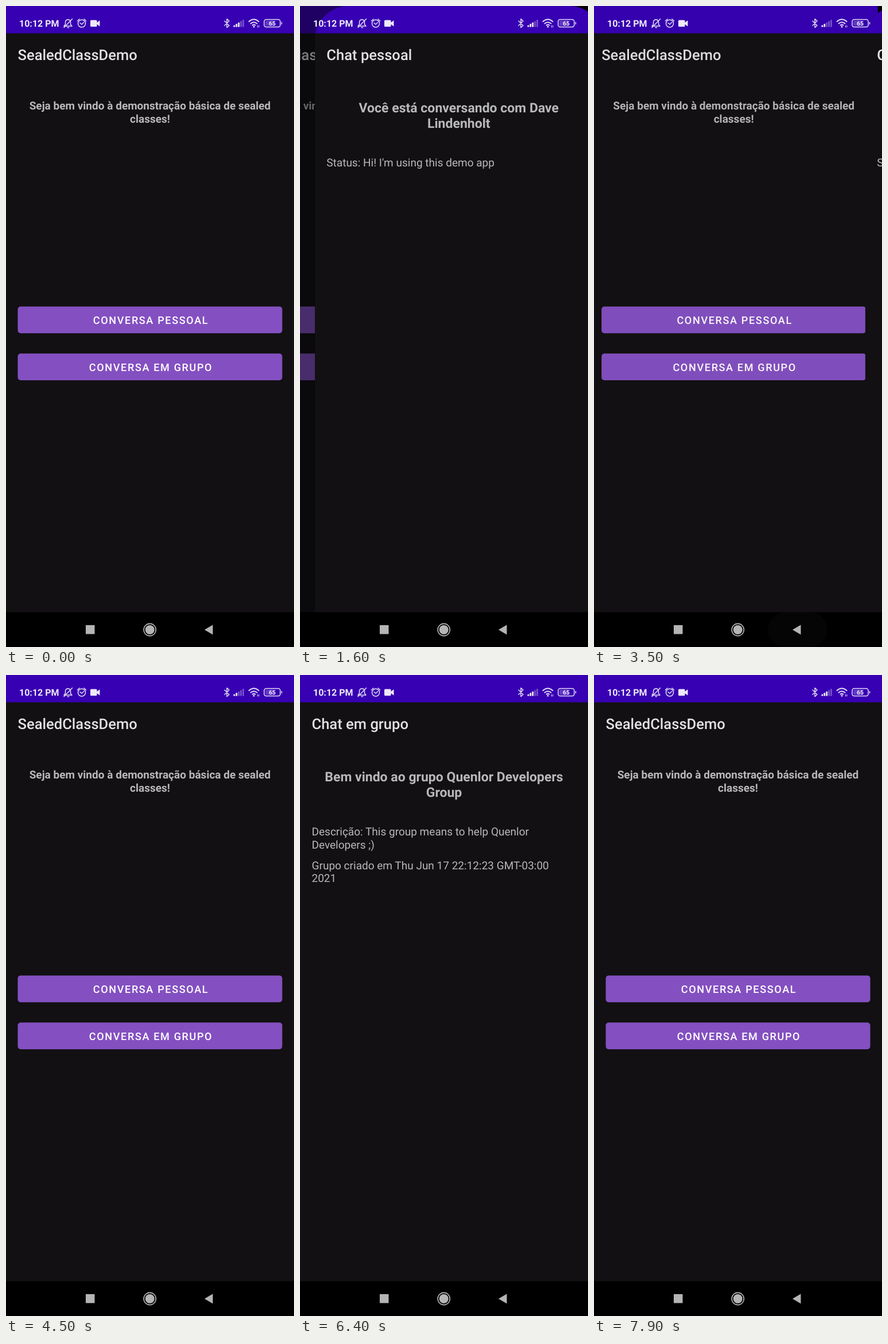
Write an HTML page that moves like this. It is 502 px wide and 1115 px high and loops after 8000 ms.

```html
<!DOCTYPE html>
<html lang="pt">
<head>
<meta charset="utf-8">
<title>Chat demo</title>
<style>
html, body { margin: 0; width: 100%; height: 100%; overflow: hidden; background: #000; }
svg { display: block; width: 100%; height: 100%; }
text { font-family: Roboto, sans-serif; font-size: 19.03px; fill: #b9b8b9; text-rendering: geometricPrecision; }
.title { font-size: 25.56px; font-weight: 500; fill: #e3e2e3; }
.bold { font-weight: 700; text-anchor: middle; }
.big { font-size: 23px; }
.label { font-size: 18.1px; font-weight: 500; letter-spacing: .0893em; text-anchor: middle; fill: #fff; }
.clock { font-size: 16px; font-weight: 700; fill: #efeaf9; }
.charge { font-size: 10.5px; font-weight: 700; text-anchor: middle; fill: #efeaf9; }
.line { fill: none; stroke: #e4dcf4; stroke-width: 1.5; stroke-linecap: round; stroke-linejoin: round; }
.solid { fill: #efeaf9; }
</style>
</head>
<body>
<svg viewBox="0 0 502 1115">
  <defs>
    <clipPath id="window"><rect id="corner" width="502" height="1200"/></clipPath>
    <clipPath id="button0"><rect x="20.5" y="522.8" width="461" height="46.4" rx="5"/></clipPath>
    <clipPath id="button1"><rect x="20.5" y="604.5" width="461" height="46.4" rx="5"/></clipPath>
    <g id="page">
      <rect width="502" height="1115" fill="#121013"/>
      <rect width="502" height="47.5" fill="#3700b3"/>
    </g>
  </defs>

  <g id="home">
    <use href="#page"/>
    <text class="title" x="20.5" y="93.5">SealedClassDemo</text>
    <text class="bold" x="251" y="180.3">Seja bem vindo à demonstração básica de sealed</text>
    <text class="bold" x="251" y="202.8">classes!</text>
    <g clip-path="url(#button0)">
      <rect y="520" width="502" height="52" fill="#8450c1"/>
      <circle class="ripple" cx="422" cy="544"/>
    </g>
    <g clip-path="url(#button1)">
      <rect y="602" width="502" height="52" fill="#8450c1"/>
      <circle class="ripple" cx="410" cy="628"/>
    </g>
    <text class="label" x="252.5" y="553">CONVERSA PESSOAL</text>
    <text class="label" x="252.5" y="634.7">CONVERSA EM GRUPO</text>
  </g>
  <rect id="dim" width="502" height="1115"/>

  <g id="chat"><g clip-path="url(#window)">
    <use href="#page"/>
    <g class="body">
      <text class="title" x="20.5" y="93.5">Chat pessoal</text>
      <text class="bold big" x="251" y="184.5">Você está conversando com Dave</text>
      <text class="bold big" x="251" y="211.5">Lindenholt</text>
      <text x="20.5" y="279">Status: Hi! I'm using this demo app</text>
    </g>
    <g class="body">
      <text class="title" x="20.5" y="93.5">Chat em grupo</text>
      <text class="bold big" x="251" y="184.5">Bem vindo ao grupo Quenlor Developers</text>
      <text class="bold big" x="251" y="211.5">Group</text>
      <text x="20.5" y="279">Descrição: This group means to help Quenlor</text>
      <text x="20.5" y="301.5">Developers ;)</text>
      <text x="20.5" y="337.7">Grupo criado em Thu Jun 17 22:12:23 GMT-03:00</text>
      <text x="20.5" y="360.2">2021</text>
    </g>
  </g></g>

  <!-- status bar -->
  <text class="clock" x="23" y="36">10:12 PM</text>
  <g class="line">
    <path d="M101 35H115L112.500 32V28Q112 24 108 23.500Q104 24 103.500 28V32L101 35M107 37.500H109.500M115.500 22.500L101 37.500"/>
    <circle cx="132" cy="30.500" r="6.500"/>
    <path d="M129 29.500L132 32L135.500 28.500M124.500 26L128 22.700M139.500 26L136 22.700"/>
    <path d="M381 26L389 34L385 37.500V22.500L389 26L381 34"/>
    <path stroke-width="2" d="M423.500 27Q432 19.500 440.500 27M426.500 30.500Q432 26 437.500 30.500M429.500 33.500Q432 31.500 434.500 33.500"/>
    <path stroke-width="1" d="M438.500 34V37M440.800 34V37"/>
    <rect x="450" y="23.500" width="28" height="13" rx="3.500"/>
    <path d="M480.500 28.500V31.500"/>
  </g>
  <rect class="solid" x="147" y="24.500" width="11.500" height="11.500" rx="1.500"/>
  <path class="solid" d="M158 29L163.500 25V35.500L158 31.500Z"/>
  <circle class="solid" cx="432" cy="36" r="1.500"/>
  <rect x="452" y="25.500" width="16" height="9" rx="1.500" fill="#6038c8"/>
  <text class="charge" x="464" y="34">65</text>
  <g id="signal"></g>

  <!-- navigation bar -->
  <rect y="1054.500" width="502" height="61" fill="#000"/>
  <rect id="navRipple" x="303" y="1054.500" width="103.500" height="61" rx="30.500" fill="#fff"/>
  <g fill="#b5b5b5">
    <rect x="139" y="1077" width="15.500" height="15.500"/>
    <circle cx="250.700" cy="1085" r="8"/>
    <circle cx="250.700" cy="1085" r="10.600" fill="none" stroke="#b5b5b5" stroke-width="1.600"/>
    <path d="M346 1085L360.500 1076.500V1093.500Z"/>
  </g>
  <g id="touch" fill="#fff">
    <circle r="17" opacity=".05"/>
    <circle r="13.500" opacity=".18"/>
  </g>
</svg>
<script>
const LOOP = 8000, STEP = 100, SLIDE = 500, WIDTH = 502;
const $ = id => document.getElementById(id);
const all = name => [...document.getElementsByClassName(name)];
const set = (el, attrs) => { for (const k in attrs) el.setAttribute(k, attrs[k]); };
const clamp = v => Math.max(0, Math.min(1, v));

// each visit: button press, window opening, back press, window closing
const visits = [
  { x: 422, y: 544, down: 850, up: 1250, open: 1300, back: 3100, close: 3210 },
  { x: 410, y: 628, down: 4580, up: 4850, open: 4950, back: 6690, close: 6807 }
];
const bodies = all('body'), ripples = all('ripple');

for (let i = 0; i < 5; i++) {
  const bar = document.createElementNS('http://www.w3.org/2000/svg', 'rect');
  const height = 3 + i * 2.4;
  set(bar, { x: 396.5 + i * 3.9, y: 36.5 - height, width: 2.8, height, rx: .6, fill: '#efeaf9' });
  $('signal').append(bar);
}

// critically damped spring, finished after SLIDE
function spring(ms) {
  if (ms <= 0) return 0;
  if (ms >= SLIDE) return 1;
  const k = ms * .0157;
  return 1 - (1 + k) * Math.exp(-k);
}

function draw(t) {
  const current = t < 4500 ? 0 : 1, v = visits[current];
  const shown = spring(t - v.open) - spring(t - v.close);
  const x = WIDTH * (1 - shown);

  set($('home'), { transform: `translate(${-.25 * WIDTH * shown})` });
  set($('dim'), { opacity: .47 * shown });
  set($('chat'), { transform: `translate(${x})`, visibility: shown ? 'visible' : 'hidden' });
  set($('corner'), { rx: shown < 1 ? 58 : 0 });
  bodies.forEach((el, i) => set(el, { display: i === current ? 'inline' : 'none' }));

  ripples.forEach((el, i) => {
    const { down, up } = visits[i];
    const grow = clamp((t - down) / 300);
    set(el, {
      r: 400 * Math.sqrt(grow),
      opacity: t < down ? 0 : .24 * clamp(1 - (t - up) / 250)
    });
  });

  const backUp = v.back + 90;
  set($('navRipple'), { opacity: t < v.back ? 0 : .13 * clamp(1 - (t - backUp) / 370) });

  const pressing = t >= v.down && t < v.up, backing = t >= v.back && t < backUp;
  set($('touch'), {
    visibility: pressing || backing ? 'visible' : 'hidden',
    transform: pressing ? `translate(${v.x} ${v.y})` : 'translate(353 1085)'
  });

  const strength = t >= 2000 && t < 6000 ? 2 : 3;
  [...$('signal').children].forEach((bar, i) => set(bar, { opacity: i < strength ? 1 : .35 }));
}

function tick() {
  draw(Math.floor(performance.now() % LOOP / STEP) * STEP);
  requestAnimationFrame(tick);
}
tick();
</script>
</body>
</html>
```
